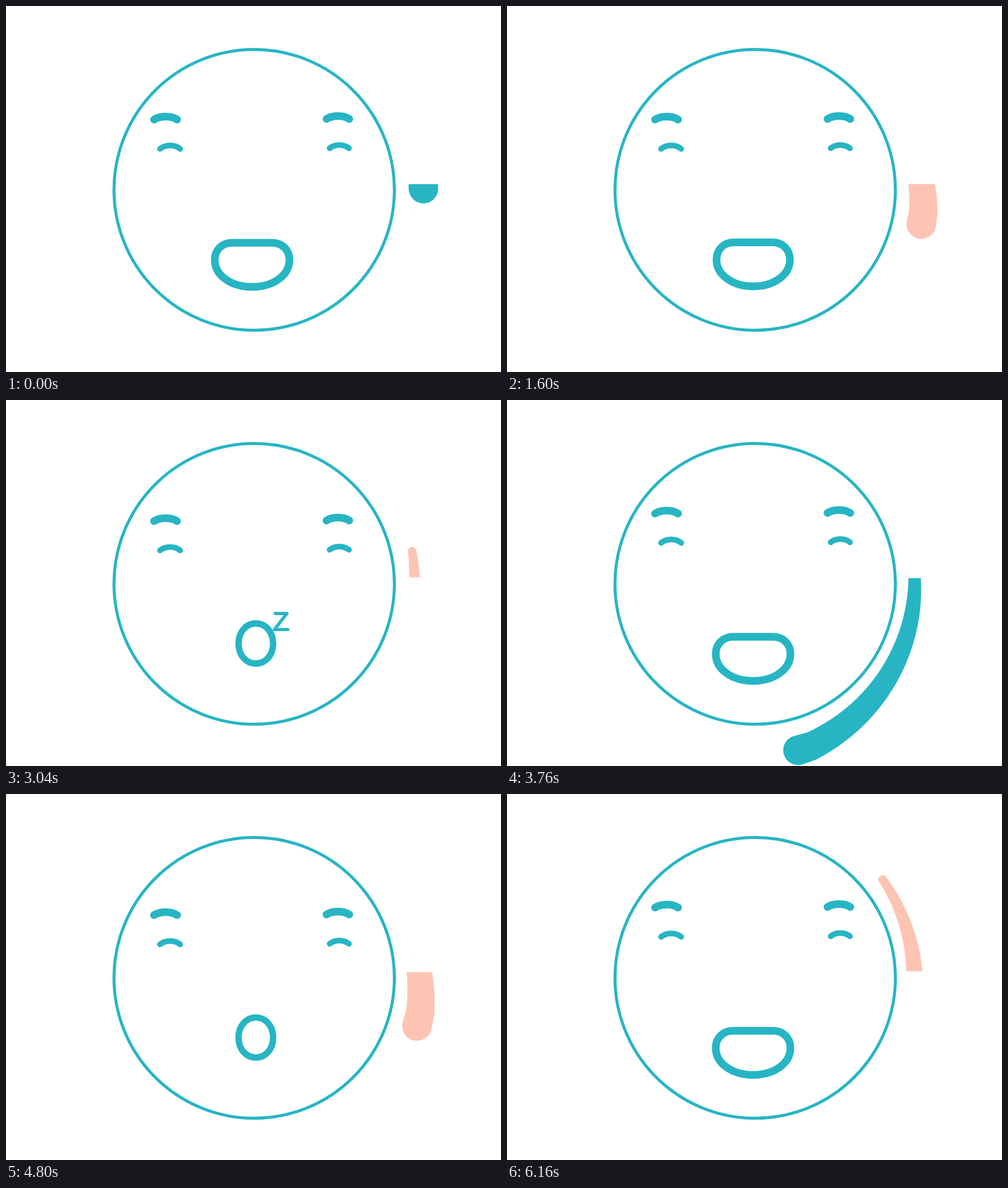
Recreate the animation shown at these times as an HTML page. Size 871x643 px, loop 6.24 s.

```html
<!DOCTYPE html>
<html>
<head>
<meta charset="utf-8">
<style>
  html, body { margin: 0; width: 100%; height: 100%; overflow: hidden; background: #fff; }
  svg { display: block; width: 871px; height: 643px; }
  .line { fill: none; stroke: #27b5c4; stroke-linecap: round; stroke-linejoin: round; }
</style>
</head>
<body>
<svg viewBox="0 0 871 643">
  <defs>
    <clipPath id="below"><rect y="313" width="871" height="330"/></clipPath>
    <clipPath id="above"><rect width="871" height="311.5"/></clipPath>
    <path id="z" d="M-11.5-15H10.5L-13 15H12"/>
  </defs>
  <path id="day" fill="#27b5c4"/>
  <path id="night" fill="#fec4b3"/>
  <circle class="line" cx="436.7" cy="323" r="246.7" stroke-width="5.2"/>
  <g id="eyes" class="line">
    <path stroke-width="13.5" d="M260.5 199.5C272 192.6 290 192.6 301 199.5M564 198.5C575 191.6 593 191.6 604 198.5"/>
    <path stroke-width="10" d="M271 251C281 243 297 243 306.5 251M569.5 250C579 242.4 594 242.4 603.5 250"/>
  </g>
  <path id="mouth" class="line"/>
  <use id="bigZ" href="#z" class="line" stroke-width="6"/>
  <use id="smallZ" href="#z" class="line" stroke-width="8"/>
</svg>
<script>
const LOOP = 6240, STEP = 80, BREATH = 2080;
const SPAN = 95;                       // degrees from comet head to tail tip
const CX = 434.5, CY = 325.5;
const $ = id => document.getElementById(id);
const clamp = x => Math.max(0, Math.min(1, x));
const mix = (a, b, k) => a + (b - a) * k;
const easeInOut = (x, p) => x < .5 ? 2 ** (p - 1) * x ** p : 1 - 2 ** (p - 1) * (1 - x) ** p;

// Moments at which each comet's head reaches the horizon on the right
const dayStarts = [0, 3170, LOOP], nightStarts = [1498, 4656];

// Clockwise head angle in degrees, s seconds after the start: slow, then speeding up
const headAngle = s => -.9 + 121 * s - 46 * s ** 2 + 100 * s ** 3;

// The tail narrows evenly and drifts inward
const width = d => 15 + .39 * d;
const radius = d => Math.min(300, 282.5 + .0047 * (d - 29) ** 2);

function cometShape(head) {
  const at = (r, d) => {
    const a = (head - SPAN + d) * Math.PI / 180;
    return `${CX + r * Math.cos(a)} ${CY + r * Math.sin(a)}`;
  };
  const out = [], back = [];
  for (let d = 0; d <= SPAN; d += 2.5) {
    out.push(at(radius(d) + width(d) / 2, d));
    back.unshift(at(radius(d) - width(d) / 2, d));
  }
  return `M${out.join('L')}A26 26 0 0 1 ${back.join('L')}A7.5 7.5 0 0 1 ${out[0]}Z`;
}

function drawComet(el, starts, t) {
  const start = starts.find(s => t > s - 80 && t < s + 1600);
  if (start === undefined) return el.setAttribute('d', '');
  const head = headAngle((t - start) / 1000);
  el.setAttribute('d', cometShape(head));
  el.setAttribute('clip-path', head < 130 ? 'url(#below)' : head > 300 ? 'url(#above)' : 'none');
}

const smile = { x: 433, stroke: 13.5, flat: 36, half: 65.7, top: 416, mid: 446, bottom: 493.5 };
const yawn = { x: 439.6, stroke: 11.3, flat: 0, half: 30.4, top: 392.5, mid: 428, bottom: 463 };

function drawMouth(k) {
  const m = {};
  for (const key in smile) m[key] = mix(smile[key], yawn[key], k);
  const { x, flat, half, top, mid, bottom } = m, bend = .57;
  const up = mix(mid, top, bend), down = mix(mid, bottom, bend);
  const corner = mix(flat, half, bend), base = half * bend;
  $('mouth').setAttribute('stroke-width', m.stroke);
  $('mouth').setAttribute('d', `M${x - flat} ${top}H${x + flat}
    C${x + corner} ${top} ${x + half} ${up} ${x + half} ${mid}
    C${x + half} ${down} ${x + base} ${bottom} ${x} ${bottom}
    C${x - base} ${bottom} ${x - half} ${down} ${x - half} ${mid}
    C${x - half} ${up} ${x - corner} ${top} ${x - flat} ${top}Z`);
}

function place(el, x, y, scale) {
  el.setAttribute('visibility', scale > .01 ? 'visible' : 'hidden');
  el.setAttribute('transform', `translate(${x} ${y}) scale(${scale})`);
}

function drawFace(t) {
  const swing = (length, power) =>
    easeInOut(clamp((t - 80) / length), power) - easeInOut(clamp((t - 1120) / length), power);
  $('eyes').setAttribute('transform', `translate(0 ${13.2 * swing(420, 2)})`);
  drawMouth(swing(600, 3));

  const rise = clamp((t - 1040) / 240);
  const grow = t < 960 ? .94 * clamp((t - 640) / 320) : .94 + .0006 * (t - 960);
  place($('bigZ'), mix(484.5, 516.7, rise), mix(389.2, 348, rise), t < 1480 ? grow : 0);
  place($('smallZ'), 504.5, 375.5, .17 * clamp((t - 950) / 90) * clamp((1240 - t) / 120));
}

function draw(t) {
  drawComet($('day'), dayStarts, t);
  drawComet($('night'), nightStarts, t);
  drawFace(t % BREATH);
}

const begin = performance.now();
function tick() {
  const t = (performance.now() - begin) % LOOP;
  draw(Math.floor(t / STEP) * STEP);
  requestAnimationFrame(tick);
}
tick();
</script>
</body>
</html>
```
